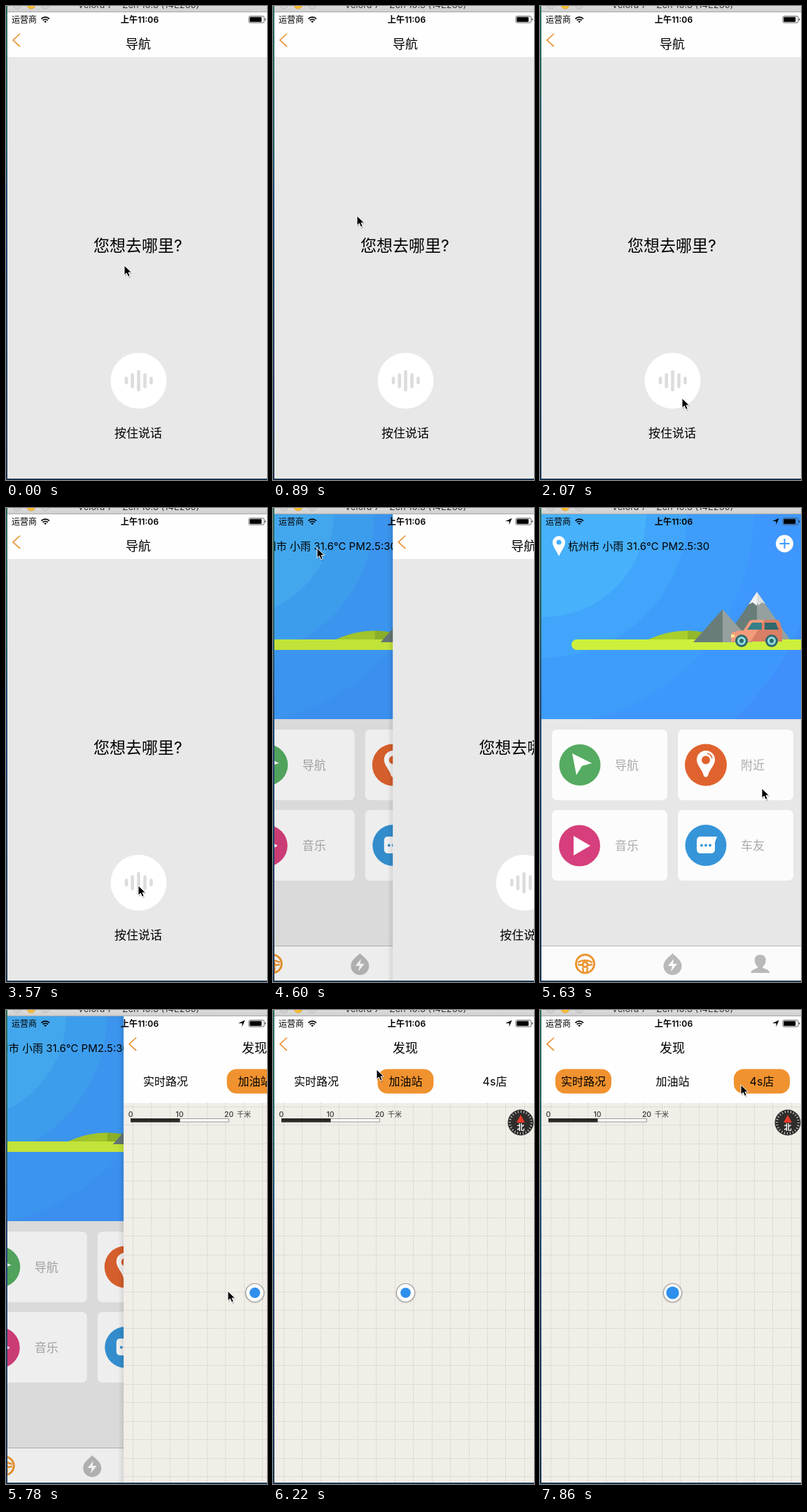
Animation of 373x678 px, one loop 8 s. Source, as an HTML page:

```html
<!DOCTYPE html>
<html lang="zh-CN">
<head>
<meta charset="utf-8">
<style>
html, body { margin: 0; width: 100%; height: 100%; overflow: hidden; background: #e7e7e7 }
svg { display: block; width: 373px; height: 678px; font-family: Inter, "Noto Sans CJK SC", "Noto Sans CJK", sans-serif }
.mid { text-anchor: middle }
.label { font-size: 17px; fill: #aaa }
.title { font-size: 18px; text-anchor: middle }
.tab { font-size: 16px; text-anchor: middle }
.scale { font-size: 10.5px; font-weight: 500; fill: #333; text-anchor: middle }
.pill { fill: #f0922f }
</style>
</head>
<body>
<svg viewBox="0 0 373 678">
  <defs>
    <linearGradient id="desk" x2="0" y2="1">
      <stop stop-color="#2b6e5e"/><stop offset=".28" stop-color="#24606a"/>
      <stop offset=".4" stop-color="#234a76"/><stop offset="1" stop-color="#1b3550"/>
    </linearGradient>
    <linearGradient id="bar" x2="0" y2="1">
      <stop stop-color="#dcdcdc"/><stop offset="1" stop-color="#cecece"/>
    </linearGradient>
    <linearGradient id="edge">
      <stop stop-opacity="0"/><stop offset="1" stop-opacity=".1"/>
    </linearGradient>
    <clipPath id="screen"><path d="M2 9H373V676H2z"/></clipPath>
    <clipPath id="sky"><path d="M2 9H373V302H2z"/></clipPath>
    <path id="back" d="M20 39.5L10 48.8L20 58" fill="none" stroke="#e8963a" stroke-width="1.7"/>
    <rect id="card" width="165" height="101" rx="7" fill="#fcfcfc"/>
    <rect id="pill" y="84.5" width="80" height="35" rx="14"/>
    <g id="wheel">
      <circle r="9" fill="#2f686d"/><circle r="6" fill="#8edcdc"/><circle r="3" fill="#2f686d"/>
    </g>
  </defs>

  <rect width="373" height="678" fill="url(#desk)"/>
  <g clip-path="url(#screen)">
    <g id="home">
      <rect x="2" y="9" width="371" height="667" fill="#e7e7e7"/>
      <g clip-path="url(#sky)">
        <path d="M2 9H373V302H2z" fill="#3f8ffd"/>
        <g id="rings"></g>
        <path d="M155 188Q211 163 262 188z" fill="#a9cf2c"/>
        <path d="M211 175.500Q240 176 262 188H211z" fill="#93b82b"/>
        <rect x="45" y="188" width="360" height="15" rx="7.500" fill="#cdf03c"/>
        <path d="M310 120L264 188H310z" fill="#687d7a"/>
        <path d="M310 120L357 188H310z" fill="#96a09f"/>
        <path d="M310 120L298 138L304 135L310 140z" fill="#f2f2f2"/>
        <path d="M310 120L322 137L317 135L313 139L310 136z" fill="#dcdfe0"/>
        <path d="M261 145L219 192H261z" fill="#687d7a"/>
        <path d="M261 145L303 192H261z" fill="#96a09f"/>
        <path d="M273 191V181Q274 176 291 175L299 162Q301 160 305 160H338Q341 160 343 164L346 176V191z" fill="#f39c7b"/>
        <path d="M321 160H338Q341 160 343 164L346 176V191H301z" fill="#d97f66"/>
        <path d="M296 174L303 164H317V174z" fill="#377f88"/>
        <path d="M321 164H337L341 174H321z" fill="#2f686d"/>
        <path d="M273 181h5v4h-5z" fill="#ffe49a"/>
        <use href="#wheel" x="288" y="190"/>
        <use href="#wheel" x="331" y="190"/>
      </g>
      <path d="M27 40a9 9 0 0 1 9 9c0 6-5 11-9 20c-4-9-9-14-9-20a9 9 0 0 1 9-9z" fill="#fff"/>
      <circle cx="27" cy="49" r="3.500" fill="#45aefb"/>
      <text x="40" y="59.500" font-size="15">杭州市 小雨 31.6℃ PM2.5:30</text>
      <circle cx="349.500" cy="51" r="12.500" fill="#fff"/>
      <path d="M342.500 51h14M349.500 44v14" stroke="#3d9afb" stroke-width="2"/>

      <use href="#card" x="17" y="317"/><use href="#card" x="197" y="317"/>
      <use href="#card" x="17" y="432"/><use href="#card" x="197" y="432"/>
      <circle cx="57" cy="367.500" r="29.500" fill="#55ab61"/>
      <path d="M46 351L74 365L60 369L52 382z" fill="#fff"/>
      <circle cx="237" cy="367.500" r="30" fill="#e0632f"/>
      <path d="M237 347a13 13 0 0 1 13 13c0 8-8 14-10 23q-3 4-6 0c-2-9-10-15-10-23a13 13 0 0 1 13-13z" fill="#fff"/>
      <circle cx="237" cy="360.500" r="6" fill="#e0632f"/>
      <path d="M239 351a9 9 0 0 1 7 7" fill="none" stroke="#e0632f" stroke-width="1.500"/>
      <circle cx="56.500" cy="483" r="29.500" fill="#d63f7c"/>
      <path d="M48 469L72 483L48 497z" fill="#fff"/>
      <circle cx="237" cy="482.500" r="29.500" fill="#3695d8"/>
      <path d="M229 470H253L250 478V488Q250 494 244 494H230Q224 494 224 488V476Q224 470 229 470z" fill="#fff"/>
      <g fill="#3695d8"><circle cx="231" cy="482.500" r="2"/><circle cx="237" cy="482.500" r="2"/><circle cx="243" cy="482.500" r="2"/></g>
      <g class="label">
        <text x="107" y="374">导航</text><text x="287" y="374">附近</text>
        <text x="107" y="489">音乐</text><text x="287" y="489">车友</text>
      </g>
      <path d="M2 626.500H373V676H2z" fill="#fbfbfb"/>
      <path d="M2 626.500H373" stroke="#b8b8b8"/>
      <g fill="none" stroke="#ec9530">
        <circle cx="64.500" cy="652" r="13" stroke-width="3"/>
        <path d="M54 650Q64.500 644 75 650M54 653l6 1M75 653l-6 1M61 657l1 7M68 657l-1 7" stroke-width="2.500"/>
        <circle cx="64.500" cy="653" r="3.500" stroke-width="3"/>
      </g>
      <path d="M189.500 637c5 5 13 10 13 18a13 13 0 0 1-26 0c0-8 8-13 13-18z" fill="#b9b9b9"/>
      <path d="M191 645L183 655H189L187 663L196 652H190z" fill="#fff"/>
      <path d="M314.500 639c6 0 9 4 8 9c0 4-2 6-4 8v2q9 2 10 7H301q1-5 10-7v-2c-2-2-4-4-4-8c-1-5 2-9 7.500-9z" fill="#b9b9b9"/>
      <rect id="dim" x="2" y="9" width="371" height="667"/>
    </g>

    <g id="voice">
      <rect x="-6" y="9" width="8" height="667" fill="url(#edge)"/>
      <rect x="2" y="9" width="371" height="64" fill="#fefefe"/>
      <rect x="2" y="73" width="371" height="603" fill="#e8e8e8"/>
      <use href="#back"/>
      <text class="title" x="189" y="60.500">导航</text>
      <text x="125" y="351" font-size="23">您想去哪里?</text>
      <circle id="halo" cx="189.500" cy="536" r="59.500" fill="#fff" opacity=".4"/>
      <circle cx="189.500" cy="536" r="40" fill="#fff"/>
      <path d="M172 532.500v6.500M180.700 527.500v17M189.500 523v26M198.500 527.500v17M207.500 532.500v6.500" stroke="#dcdcdc" stroke-width="4.600" stroke-linecap="round"/>
      <text class="mid" x="189" y="617" font-size="17">按住说话</text>
    </g>

    <g id="map">
      <rect x="-6" y="9" width="8" height="667" fill="url(#edge)"/>
      <rect x="2" y="9" width="371" height="124" fill="#fefefe"/>
      <rect x="2" y="133" width="371" height="543" fill="#f1eee8"/>
      <path id="grid" fill="none" stroke="#d2d0cb" stroke-dasharray="2 1.500"/>
      <use href="#back"/>
      <text class="title" x="189" y="60.500">发现</text>
      <use id="road" class="pill" href="#pill" x="22"/>
      <use id="fuel" class="pill" href="#pill" x="149.500"/>
      <use id="shop" class="pill" href="#pill" x="277"/>
      <g class="tab">
        <text x="62" y="107.500">实时路况</text><text x="189.500" y="107.500">加油站</text><text x="317" y="107.500">4s店</text>
      </g>
      <g class="scale">
        <text x="12" y="153">0</text><text x="82" y="153">10</text><text x="152.500" y="153">20</text>
        <text x="174" y="153" font-size="10">千米</text>
      </g>
      <rect x="12.500" y="155.500" width="140" height="4.500" fill="#fff" stroke="#999"/>
      <rect x="12" y="155" width="70.500" height="5.500" fill="#2b2926"/>
      <circle cx="354" cy="161" r="18.500" fill="#2f2d2b"/>
      <circle cx="354" cy="161" r="15.500" fill="none" stroke="#ddd" stroke-width="3" pathLength="48" stroke-dasharray=".5 1.500"/>
      <path d="M354 150L360 161H348z" fill="#e8392b"/>
      <text class="mid" x="354" y="172" font-size="11" font-weight="600" fill="#fff">北</text>
      <circle cx="189.500" cy="405" r="14.500" opacity=".12"/>
      <circle cx="189.500" cy="404.500" r="13" fill="#fff" stroke="#888" stroke-opacity=".7" stroke-width="1.200"/>
      <circle id="dot" cx="189.500" cy="404.500" fill="#2e8fec"/>
    </g>
  </g>

  <text x="8" y="24" font-size="12">运营商</text>
  <g fill="none" stroke="#000" stroke-width="1.800">
    <path d="M50.500 18.300a8 8 0 0 1 11.400 0M52.700 20.500a5 5 0 0 1 7 0"/>
  </g>
  <path d="M54.300 22.200a2.700 2.700 0 0 1 3.800 0l-1.900 1.900z"/>
  <text class="mid" x="191" y="24" font-size="12.200" font-weight="600">上午11:06</text>
  <path id="arrow" d="M341.500 14.500L337.500 24V19H332z"/>
  <rect x="347" y="14.500" width="22" height="9.500" rx="2" fill="none" stroke="#444" stroke-width=".8"/>
  <rect x="348.300" y="15.800" width="17" height="7" rx="1"/>
  <path d="M370 17.500q2 1.700 0 3.500z"/>

  <rect x="2" width="371" height="9" fill="url(#bar)"/>
  <path d="M2 8.500H373" stroke="#aaa"/>
  <g stroke-width=".8">
    <circle cx="15.500" cy="-2" r="6" fill="#d2d2d2" stroke="#b5b5b5"/>
    <circle cx="36" cy="-2" r="6" fill="#fbbd2e" stroke="#dfa023"/>
    <circle cx="56" cy="-2" r="6" fill="#d2d2d2" stroke="#b5b5b5"/>
  </g>
  <text class="mid" x="189.500" y="2.500" font-size="13" fill="#333">Velora 7 – Zen 10.3 (14E269)</text>

  <g id="cursor">
    <path d="M1 2v14l3.300-3 2.300 5.200 2.600-1.100-2.200-5h4.500z" opacity=".2"/>
    <path d="M0 0v14l3.300-3 2.300 5.200 2.600-1.100-2.200-5h4.500z" stroke="#fff" stroke-width="1"/>
  </g>
</svg>
<script>
const LOOP = 8000, STEP = 148.3, WIDTH = 371, PARALLAX = 120;
const el = id => document.getElementById(id);
const show = (id, on) => el(id).style.display = on ? "" : "none";
const shift = (id, x, y = 0) => el(id).setAttribute("transform", `translate(${x} ${y})`);
const slide = u => 1 - (1 - Math.min(1, Math.max(0, u))) ** 2.5;

const path = [
  [0, 169, 371], [3, 215, 560], [4, 222, 600], [6, 120, 300], [8, 41, 62],
  [9, 18, 47], [10, 19, 48], [12, 130, 330], [14, 203, 561], [15, 222, 600],
  [16, 196, 548], [18, 191, 541], [23, 191, 541], [24, 189, 540], [27, 80, 230],
  [29, 15, 47], [30, 15, 47], [32, 111, 68], [35, 305, 395], [36, 305, 395],
  [38, 317, 401], [39, 317, 402], [40, 240, 240], [42, 148, 85], [44, 105, 100],
  [46, 62, 102], [47, 62, 102], [51, 318, 108], [53, 287, 107]
];

function pointer(tick) {
  const i = path.findIndex(p => p[0] >= tick);
  if (i < 1) return path[0].slice(1);
  const [t0, x0, y0] = path[i - 1], [t1, x1, y1] = path[i];
  const u = (tick - t0) / (t1 - t0);
  return [x0 + (x1 - x0) * u, y0 + (y1 - y0) * u];
}

el("rings").innerHTML = [[400, "#3e97fc"], [300, "#3e9dfb"], [205, "#41a6fb"], [147, "#47b1fb"]]
  .map(([r, fill]) => `<circle cx="5" cy="9" r="${r}" fill="${fill}"/>`).join("");

let lines = "";
for (let i = 0; i < 21; i++) {
  const at = start => Math.floor(start + i * 26.45) + .5;
  if (i < 14) lines += `M${at(15.5)} 133V676`;
  lines += `M2 ${at(138.5)}H373`;
}
el("grid").setAttribute("d", lines);

function draw(now) {
  const tick = Math.min(53, Math.floor((now % LOOP + 12) / STEP)), t = tick * STEP;
  const pop = slide((t - 4500) / 450), push = slide((t - 5660) / 450);
  const behind = 1 - pop + push;
  shift("voice", WIDTH * pop);
  shift("home", -PARALLAX * behind);
  shift("map", WIDTH * (1 - push));
  el("dim").setAttribute("opacity", .1 * behind);
  show("voice", pop < 1);
  show("map", push > 0);
  show("halo", tick === 17);
  show("arrow", tick >= 31);
  show("road", tick >= 47);
  show("fuel", tick < 53);
  show("shop", tick >= 53);
  el("dot").setAttribute("r", 8.2 + .9 * Math.cos(Math.PI * (t - 7860) / 1640));
  shift("cursor", ...pointer(tick));
  requestAnimationFrame(draw);
}
requestAnimationFrame(draw);
</script>
</body>
</html>
```
